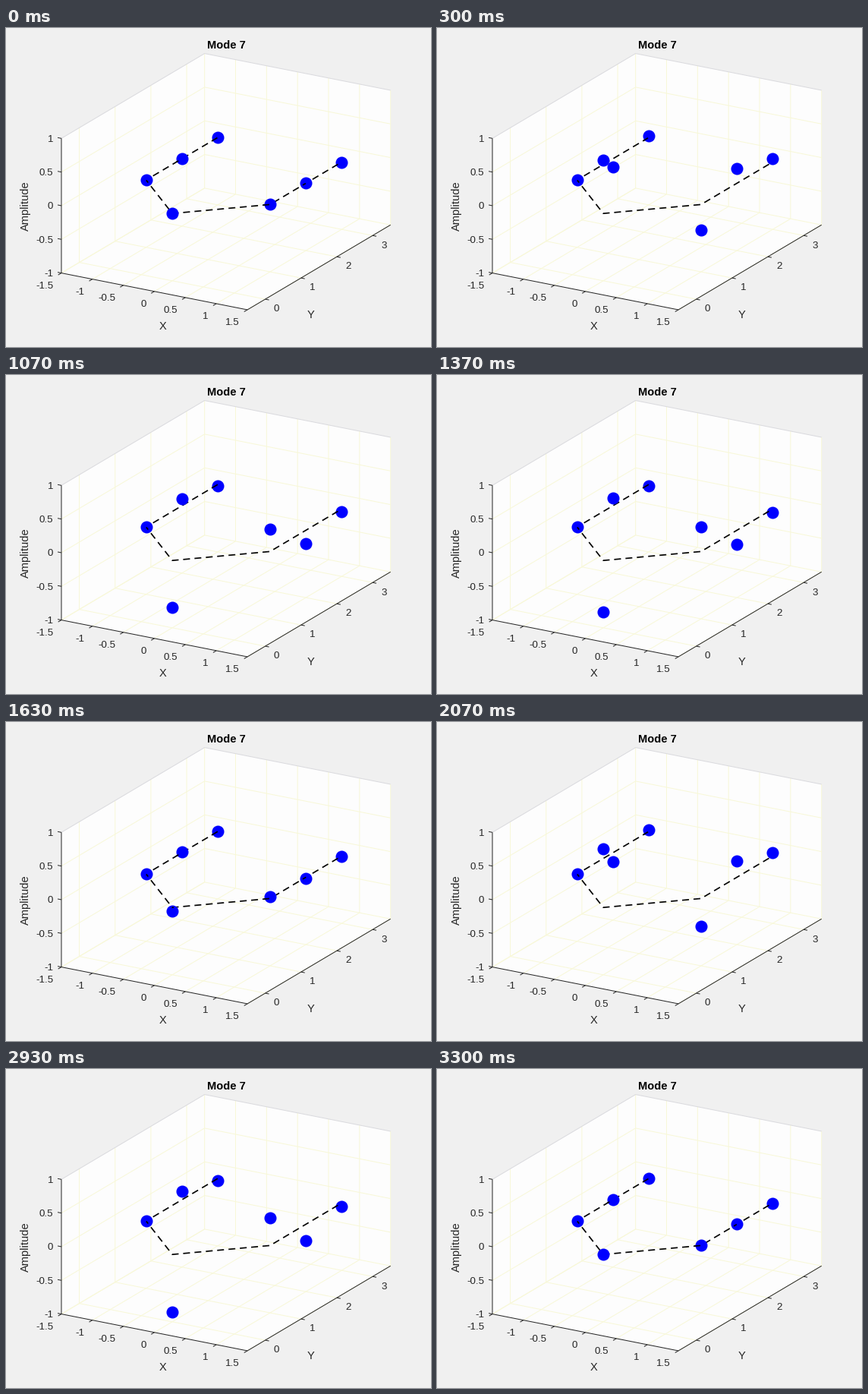
Recreate the animation shown at these times as a matplotlib script. Size 560 px wide and 420 px high, loop 3.33 s.

```python
import numpy as np
import matplotlib.pyplot as plt
from matplotlib.animation import FuncAnimation
from matplotlib.collections import LineCollection

W, H, DPI = 560, 420, 100
TICK_MS, LOOP_MS = 10, 3330
STEPS, CYCLES = 100, 2             # poses per loop, oscillations per loop
PX = 72 / DPI                      # points per pixel
UNIT = 94.32                       # pixels per axis unit
AZ, EL = np.radians(30), np.radians(20)
INK, GRID, EDGE = "#262626", "#f8f8d8", "#dadade"
RADIUS = 8

X0, X1, Y0, Y1, Z0, Z1 = -1.5, 1.5, -0.5, 3.5, -1, 1
XT = np.arange(-1.5, 1.6, 0.5)
YT = np.arange(0, 4)
ZT = np.arange(-1, 1.1, 0.5)

plt.rcParams["font.family"] = "Liberation Sans"


def project(x, y, z):
    """Orthographic view of a data point, in stage pixels."""
    dx, dy, dz = x - X0, y - Y0, z - Z0
    sx = 73 + UNIT * (np.cos(AZ) * dx + np.sin(AZ) * dy)
    sy = 322.6 + UNIT * (np.sin(EL) * (np.sin(AZ) * dx - np.cos(AZ) * dy)
                         - np.cos(EL) * dz)
    return sx, sy


def depth(x, y, z):
    """Larger values are nearer to the viewer."""
    return (np.sin(EL) * z
            - np.cos(EL) * (np.sin(AZ) * x + np.cos(AZ) * y))


fig = plt.figure(figsize=(W / 100, H / 100), dpi=DPI, facecolor="#f0f0f0")
ax = fig.add_axes([0, 0, 1, 1])
ax.set_xlim(0, W)
ax.set_ylim(H, 0)
ax.axis("off")


def strokes(lines, color, zorder):
    ax.add_collection(LineCollection(lines, colors=color, linewidths=PX,
                                     zorder=zorder), autolim=False)


def label(x, y, text, size=13.33, ha="center", color=INK, **kw):
    """Text placed by its baseline."""
    ax.text(x, y, text, fontsize=size * PX, ha=ha, va="baseline",
            color=color, **kw)


def draw_box():
    outline = [(X0, Y0, Z1), (X0, Y1, Z1), (X1, Y1, Z1),
               (X1, Y1, Z0), (X1, Y0, Z0), (X0, Y0, Z0)]
    corners = [project(*p) for p in outline]
    ax.fill(*zip(*corners), color="#fdfdfd", lw=0, zorder=1)
    grid = []
    for x in XT:
        grid.append([(x, Y0, Z0), (x, Y1, Z0), (x, Y1, Z1)])
    for y in YT:
        grid.append([(X1, y, Z0), (X0, y, Z0), (X0, y, Z1)])
    for z in ZT[:-1]:
        grid.append([(X0, Y0, z), (X0, Y1, z), (X1, Y1, z)])
    strokes([[project(*p) for p in line] for line in grid], GRID, 2)
    strokes([corners[:3]], EDGE, 2)


def draw_axes():
    corners = [(X0, Y0, Z1), (X0, Y0, Z0), (X1, Y0, Z0), (X1, Y1, Z0)]
    lines = [[project(*p) for p in corners]]
    for x in XT:
        px, py = project(x, Y0, Z0)
        lines.append([(px, py), (px - 4.3, py + 2.5)])
        label(px - 10.5, py + 20, f"{x:g}", ha="right")
    for y in YT:
        px, py = project(X1, y, Z0)
        lines.append([(px, py), (px + 4.9, py + 1)])
        label(px + 11, py + 16.3, f"{y:g}", ha="left")
    for z in ZT:
        px, py = project(X0, Y0, z)
        lines.append([(px, py), (px - 4.9, py - 1)])
        label(px - 11, py + 4.5, f"{z:g}", ha="right")
    strokes(lines, INK, 3)
    label(207, 397, "X", 14.67)
    label(401.5, 382, "Y", 14.67)
    label(30, 234, "Amplitude", 14.67, rotation=90, rotation_mode="anchor")
    label(290, 27, "Mode 7", 14.67, color="black", weight="bold")


draw_box()
draw_axes()

# Node positions at rest and their mode shape
NX = np.array([-1, -1, -1, 0, 1, 1, 1])
NY = np.array([3, 2, 1, 0, 1, 2, 3])
SHAPE = np.array([0.026, -0.133, 0, 0.87, -0.414, 0.243, 0.055])

# Rest shape as a dashed line, sampled finely along its screen length
DASH, GAP = 9, 6
node_x, node_y = project(NX, NY, 0)
reach = np.r_[0, np.cumsum(np.hypot(np.diff(node_x), np.diff(node_y)))]
along = np.arange(0, reach[-1], 0.5)
path_x, path_y = (np.interp(along, reach, n) for n in (NX, NY))
line_x, line_y = project(path_x, path_y, 0)
line_y[along % (DASH + GAP) > DASH] = np.nan
line_depth = depth(path_x, path_y, 0)

style = dict(color="black", lw=1.7 * PX, solid_capstyle="butt")
ax.plot(line_x, line_y, zorder=4, **style)
nodes, = ax.plot([], [], "o", color="#0000ff", ms=2 * RADIUS * PX, mew=0,
                 zorder=5)
front, = ax.plot([], [], zorder=6, **style)


def update(tick):
    # Poses change every 33.3 ms, rounded to the 10 ms tick
    step = int((tick + 0.5) * TICK_MS * STEPS / (LOOP_MS + 10 / 3))
    z = SHAPE * np.sin(2 * np.pi * CYCLES * step / (STEPS - 1))
    mx, my = project(NX, NY, z)
    nodes.set_data(mx, my)
    # Parts of the line that pass in front of a node
    near = np.hypot(line_x[:, None] - mx, line_y[:, None] - my) < RADIUS + 1
    over = near & (line_depth[:, None] > depth(NX, NY, z) + 1e-6)
    front.set_data(line_x, np.where(over.any(axis=1), line_y, np.nan))
    return nodes, front


anim = FuncAnimation(fig, update, frames=LOOP_MS // TICK_MS,
                     interval=TICK_MS, repeat=True, repeat_delay=0,
                     blit=False)
plt.show()
```
